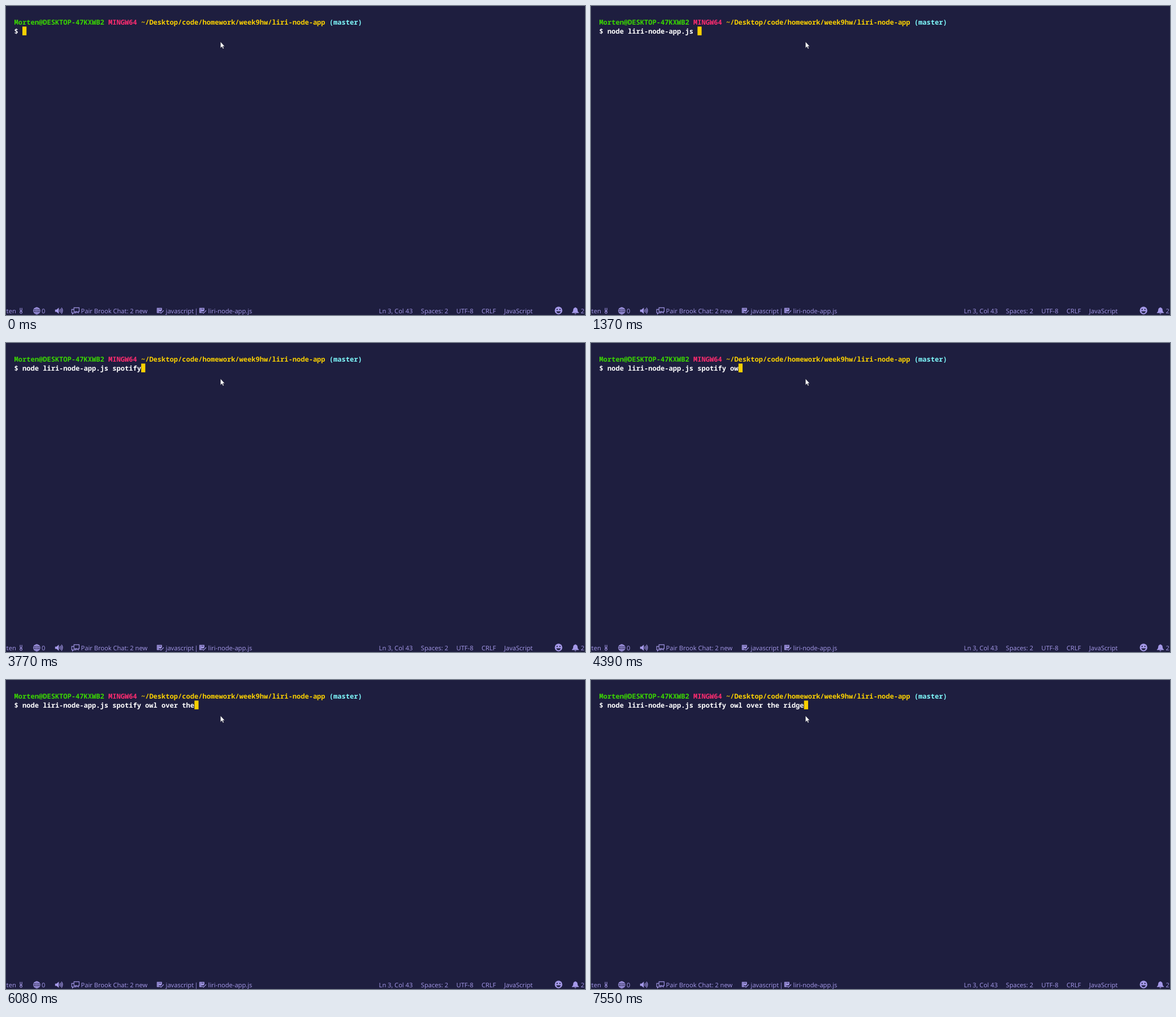
These frames come from a looping animation (1024 px wide and 547 px high, 8 s). An HTML page:

```html
<!DOCTYPE html>
<html lang="en">
<head>
<meta charset="utf-8">
<title>Terminal</title>
<style>
:root { --bg: #1e1e3f; --dim: #a599e9; --gold: #fad000; }
html, body { margin: 0; width: 100%; height: 100%; overflow: hidden; background: var(--bg); }
svg { display: block; width: 100%; height: 100%; }
text { white-space: pre; text-rendering: geometricPrecision; }
.term { font: 600 12.075px "Noto Sans Mono", "DejaVu Sans Mono", monospace; fill: #fff; }
.bar { font: 500 11.15px "Open Sans", "Noto Sans", sans-serif; fill: var(--dim); }
.fill { fill: var(--dim); }
.line { fill: none; stroke: var(--dim); stroke-width: 1.1; }
.cut { fill: none; stroke: var(--bg); }
.green { fill: #3ad900; }
.pink { fill: #ff2c70; }
.gold { fill: var(--gold); }
.cyan { fill: #80fcff; }
</style>
</head>
<body>
<svg viewBox="0 0 1024 547">
  <defs>
    <g id="note">
      <path class="fill" d="M0 0h9v4.4L6.6 6.8 5 5.4 3.4 7 5.6 9.2H0z"/>
      <path class="cut" d="M1.4 2.3h1.2M3.8 2.3h3.8M1.4 4.6h1.2M1.4 6.9h1.2"/>
      <path class="line" d="M5 7.3l2.2 2.2 4.9-4.9" stroke-width="1.3"/>
    </g>
  </defs>

  <g class="term">
    <text x="14.5" y="33"><tspan class="green">Morten@DESKTOP-47KXWB2</tspan> <tspan class="pink">MINGW64</tspan> <tspan class="gold">~/Desktop/code/homework/week9hw/liri-node-app</tspan> <tspan class="cyan">(master)</tspan></text>
    <text id="line" x="14.5" y="48.5"></text>
  </g>
  <rect id="cursor" class="gold" y="36.4" width="7.25" height="15.5"/>
  <path d="M379.3 63.2v11.2l2.6-2.4 1.8 3.9 1.7-.8-1.8-3.7h3.2z" fill="#fff" stroke="#112" stroke-width=".5"/>

  <g class="bar" transform="translate(0 543.6)">
    <text x="17.8" text-anchor="end">Morten</text>
    <text x="63">0</text>
    <text x="132.6">Pair Brook Chat: 2 new</text>
    <text x="282.6">javascript</text>
    <text x="333.2">|</text>
    <text x="357.6">liri-node-app.js</text>
    <text x="659.6">Ln 3, Col 43<tspan dx="14.5">Spaces: 2</tspan><tspan dx="14.5">UTF-8</tspan><tspan dx="14.5">CRLF</tspan><tspan dx="14.5">JavaScript</tspan></text>
    <text x="1016.4">2</text>
  </g>

  <!-- medal -->
  <path class="line" d="M25.1 534.6v4M28.1 534.6v4M24.8 538.6l1.8 1.2 1.8-1.2"/>
  <circle class="line" cx="26.6" cy="542.3" r="1.9"/>

  <!-- globe -->
  <g class="line">
    <circle cx="54.4" cy="539.5" r="5.7"/>
    <ellipse cx="54.4" cy="539.5" rx="2.7" ry="5.7"/>
    <path d="M54.4 533.8v11.4M48.7 539.5h11.4M49.6 536.4h9.6M49.6 542.6h9.6"/>
  </g>

  <!-- speaker -->
  <path class="fill" d="M86.8 537.4h2.6l4-3.4v11l-4-3.4h-2.6z"/>
  <path class="line" d="M94.8 537.4q1.7 2.1 0 4.2M96.5 535.8q3 3.7 0 7.4M98.1 534.2q4 5.3 0 10.6"/>

  <!-- speech bubbles -->
  <path class="line" d="M120.2 537.2v-3.1h9.2v7h-1.6v2.4l-2.4-2.4h-5.2v-4h-4v6h1.4v2l2-2h4.6v-1.8"/>

  <use href="#note" x="266.8" y="534.4"/>
  <use href="#note" x="341.9" y="534.4"/>

  <!-- smiley -->
  <circle class="fill" cx="977.2" cy="539" r="6.7"/>
  <g fill="var(--bg)">
    <circle cx="974.7" cy="537.2" r="1.1"/>
    <circle cx="979.7" cy="537.2" r="1.1"/>
    <path d="M973.2 540.6h8q-1.3 3.2-4 3.2t-4-3.2z"/>
  </g>

  <!-- bell -->
  <path class="fill" d="M1006.2 534q.8-1.4 1.6 0 3 .8 3 4 0 3.4 2.4 4.8v.8h-12.4v-.8q2.4-1.4 2.4-4.8 0-3.2 3-4zM1005.2 544.2h3.6q-1.8 2.4-3.6 0z"/>
</svg>
<script>
const LOOP = 8000, LEFT = 14.5, CELL = 7.245;
const PROMPT = "$ ";

// bursts of typing: start, text, ms per key (0 = tab completion)
const BURSTS = [
  [420, "no", 80],
  [650, "de", 230],
  [1130, " l", 70],
  [1370, "iri-node-app.js ", 0],
  [2380, "sp", 230],
  [3070, "otify", 175],
  [4080, " o", 230],
  [4390, "wl", 310],
  [5230, " over ", 108],
  [6000, "the", 40],
  [6860, " ridge", 138]
];

const line = document.getElementById("line");
const cursor = document.getElementById("cursor");

function typedAt(t) {
  return BURSTS.map(([start, text, gap]) => {
    if (t < start) return "";
    return gap ? text.slice(0, Math.floor((t - start) / gap) + 1) : text;
  }).join("");
}

function draw() {
  const text = PROMPT + typedAt(performance.now() % LOOP);
  line.textContent = text;
  cursor.setAttribute("x", LEFT + text.length * CELL);
  requestAnimationFrame(draw);
}
draw();
</script>
</body>
</html>
```
